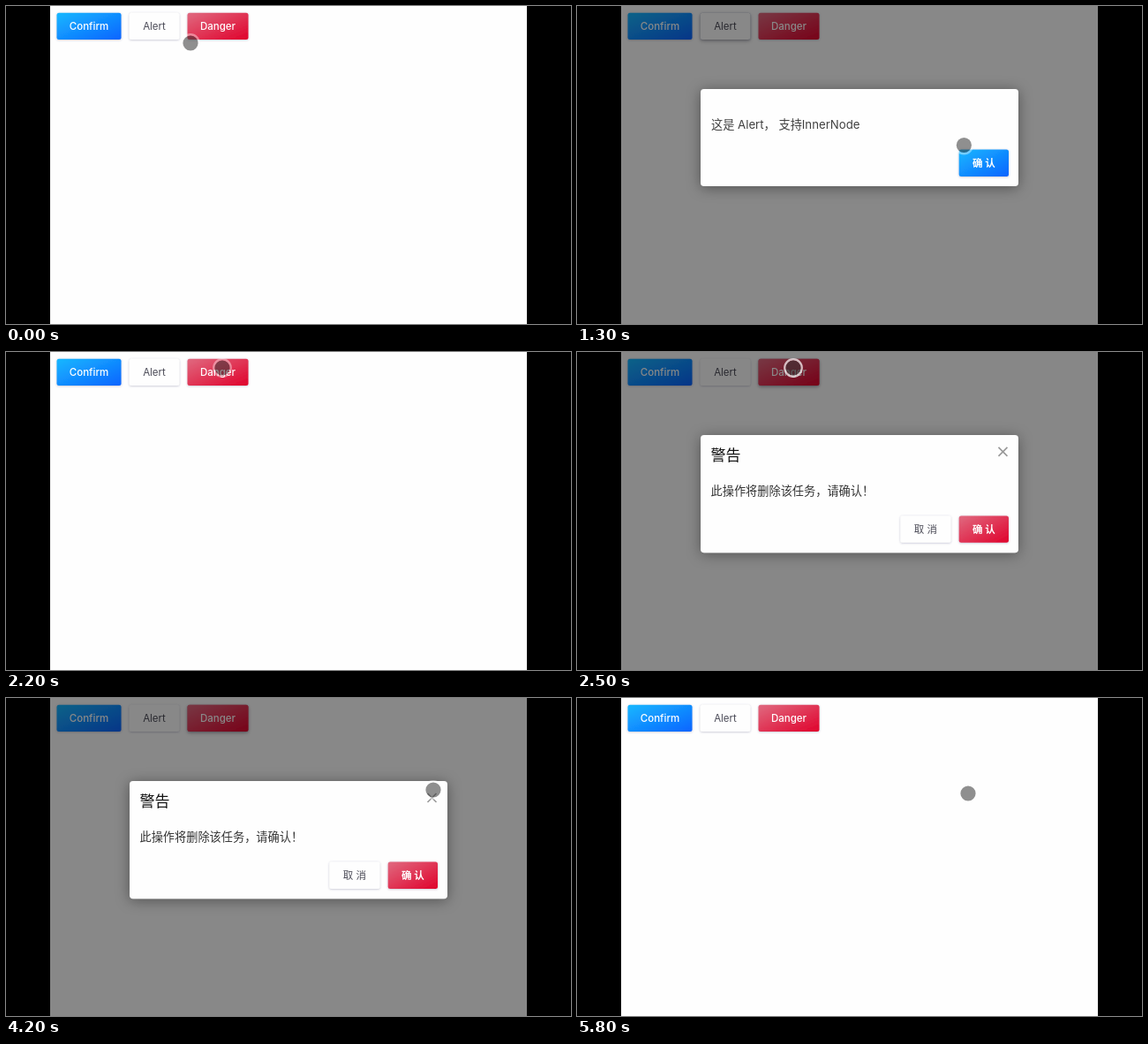
An HTML page that plays this animation: 640 by 360 pixels, repeating every 5900 ms.

```html
<!DOCTYPE html>
<html lang="zh-CN">
<head>
<meta charset="utf-8">
<title>Dialogs</title>
<style>
  html, body { margin: 0; width: 100%; height: 100%; overflow: hidden; background: #000; }
  svg { display: block; width: 100vw; height: 100vh; }
  text { font-family: Inter, "Noto Sans CJK SC", "Noto Sans CJK", sans-serif; }
</style>
</head>
<body>
<svg id="stage" viewBox="0 0 640 360"></svg>
<script>
const LOOP = 5900, STEP = 100, FADE = 200;
const stage = document.getElementById('stage');

const skins = {
  primary: { fill: 'url(#blue)', ink: '#fff', weight: 500, glow: '#0a4cc0' },
  plain: { fill: '#fefefe', ink: '#4c4c58', weight: 400, glow: '#204070' },
  danger: { fill: 'url(#red)', ink: '#fff', weight: 500, glow: '#b00020' }
};

function text(x, y, size, content, attrs = '') {
  return `<text x="${x}" y="${y}" font-size="${size}" ${attrs}>${content}</text>`;
}

function button(id, x, y, w, h, label, skinName, weight) {
  const skin = skins[skinName];
  const box = `x="${x}" y="${y}" width="${w}" height="${h}" rx="2.5"`;
  return `<g id="${id}">
    <rect class="focus" ${box} fill="${skin.glow}" filter="url(#glow)" opacity="0"/>
    <rect ${box} fill="${skin.fill}" filter="url(#lift)"/>
    <rect class="hover" ${box} fill="#def3ff" opacity="0"/>
    ${text(x + w / 2, y + h / 2 + 4.1, 11.5, label,
      `class="label" text-anchor="middle" fill="${skin.ink}" font-weight="${weight || skin.weight}"`)}
  </g>`;
}

function dialog(id, height, content) {
  return `<g id="${id}">
    <rect x="50" width="540" height="360" fill="#000" opacity=".465"/>
    <g class="panel">
      <rect x="140" y="94" width="360" height="${height}" rx="4" fill="#fefefe" filter="url(#float)"/>
      ${content}
    </g>
  </g>`;
}

function gradient(id, from, to) {
  return `<linearGradient id="${id}" x2="1" y2="1">
    <stop stop-color="${from}"/><stop offset="1" stop-color="${to}"/></linearGradient>`;
}

function shadow(id, dy, blur, color, opacity) {
  return `<filter id="${id}" x="-30%" y="-60%" width="160%" height="220%">
    <feDropShadow dx="0" dy="${dy}" stdDeviation="${blur}" flood-color="${color}" flood-opacity="${opacity}"/></filter>`;
}

stage.innerHTML = `
  <defs>
    ${gradient('blue', '#18b8ff', '#0a64ff')}
    ${gradient('red', '#e06a80', '#e0022c')}
    ${shadow('lift', 0.6, 0.9, '#30306a', 0.32)}
    ${shadow('float', 2, 8, '#000', 0.4)}
    ${shadow('glow', 2, 2.2, '#000', 0.5)}
  </defs>
  <rect width="640" height="360"/>
  <rect x="50" width="540" height="360" fill="#fefefe"/>
  ${button('openConfirm', 57.5, 7.7, 73, 30.3, 'Confirm', 'primary')}
  ${button('openAlert', 139.7, 7.7, 56.6, 30.3, 'Alert', 'plain')}
  ${button('openDanger', 205.5, 7.7, 69, 30.3, 'Danger', 'danger')}
  ${dialog('alertBox', 110,
    text(152, 138.5, 13.2, '这是 Alert， 支持InnerNode', 'fill="#404040"') +
    button('alertOk', 432.7, 162.5, 56.3, 30.5, '确 认', 'primary', 700))}
  ${dialog('dangerBox', 133.3,
    text(151.5, 123.2, 17, '警告', 'fill="#111" font-weight="500"') +
    text(151.5, 161.8, 13.2, '此操作将删除该任务，请确认！', 'fill="#333"') +
    '<path d="M477.5 108l10 10m0-10l-10 10" stroke="#999" stroke-width="1.6"/>' +
    button('cancel', 366.3, 185.6, 57.2, 30.4, '取 消', 'plain', 500) +
    button('dangerOk', 432.7, 185.6, 56.3, 30.4, '确 认', 'danger', 700))}
  <g id="cursor">
    <circle id="ring" r="9.7" fill="none" stroke="#fff" stroke-width="2.4"/>
    <circle r="8.6" fill="#333" fill-opacity=".55"/>
  </g>`;

const find = selector => stage.querySelector(selector);
const clamp = v => Math.max(0, Math.min(1, v));
const progress = (t, start, length) => clamp((t - start) / length);
const easeOut = p => 1 - (1 - p) ** 2;
const smooth = p => p * p * (3 - 2 * p);
const mix = (a, b, p) => a + (b - a) * p;

// Pointer stops: time, x, y
const path = [
  [0, 209, 42], [300, 187, 12], [750, 187, 12], [1450, 472, 177],
  [1650, 472, 177], [2200, 245, 18], [2600, 245, 18], [3200, 396, 200],
  [3400, 398, 201], [3700, 460, 201], [3900, 464, 198], [4200, 484, 104],
  [4500, 486, 112], [4900, 485, 112], [5300, 476, 110], [5800, 443, 108]
];

const dialogs = [
  { box: '#alertBox', opener: '#openAlert', open: 454, close: 1530, centre: 149 },
  { box: '#dangerBox', opener: '#openDanger', open: 2305, close: 4730, centre: 160.65 }
];

function pointerAt(t) {
  const next = path.findIndex(stop => stop[0] > t);
  if (next < 0) return path[path.length - 1].slice(1);
  const [t0, x0, y0] = path[next - 1], [t1, x1, y1] = path[next];
  const p = smooth((t - t0) / (t1 - t0));
  return [mix(x0, x1, p), mix(y0, y1, p)];
}

function drawDialog(t, { box, opener, open, close, centre }) {
  const shown = easeOut(progress(t, open, FADE)) - easeOut(progress(t, close, FADE));
  const shrink = 0.4 * (1 - shown);
  const rise = 145.5 * shrink ** 0.845;
  find(box).setAttribute('opacity', shown);
  find(box + ' .panel').setAttribute('transform',
    `translate(320 ${centre - rise}) scale(${1 - shrink}) translate(-320 ${-centre})`);
  const focus = progress(t, open, FADE) - progress(t, close + FADE, 300);
  find(opener + ' .focus').setAttribute('opacity', focus * 0.45);
}

function drawHover(t, id, start, end) {
  const on = progress(t, start, FADE) - progress(t, end, FADE);
  find(id + ' .hover').setAttribute('opacity', on);
  find(id + ' .label').setAttribute('fill', on > 0.5 ? '#3a8fd8' : skins.plain.ink);
}

function draw(t) {
  dialogs.forEach(d => drawDialog(t, d));
  drawHover(t, '#openAlert', 100, 700);
  drawHover(t, '#cancel', 3050, 3500);
  const pressed = dialogs.some(d => t >= d.open && t < d.open + 350 || t >= d.close && t < d.close + 150);
  find('#ring').setAttribute('opacity', pressed ? 0.7 : 0.4);
  find('#cursor').setAttribute('transform', `translate(${pointerAt(t)})`);
}

const began = performance.now();
function tick() {
  const t = (performance.now() - began) % LOOP;
  draw(Math.floor(t / STEP) * STEP);
  requestAnimationFrame(tick);
}
tick();
</script>
</body>
</html>
```
